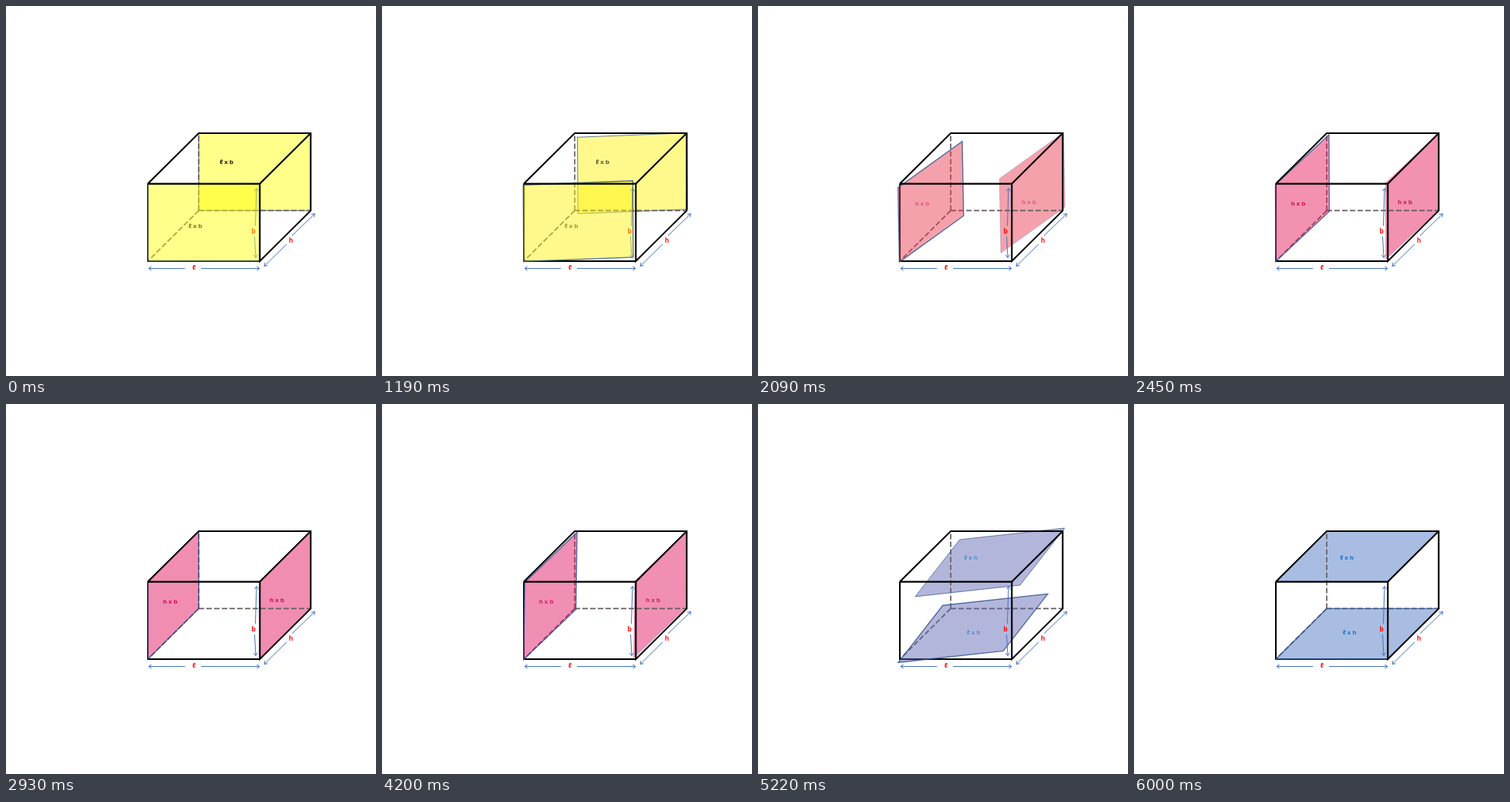
Recreate the animation shown at these times as an HTML page with a canvas. Size 480 by 480 pixels, loop 7.2 s.

```html
<!DOCTYPE html>
<html lang="en">
<head>
<meta charset="utf-8">
<title>Faces of a cuboid</title>
<style>
html, body { margin: 0; width: 100%; height: 100%; overflow: hidden; background: #fff; }
canvas { display: block; width: 480px; height: 480px; }
</style>
</head>
<body>
<canvas id="stage" width="480" height="480"></canvas>
<script>
const ctx = document.getElementById('stage').getContext('2d');
const LOOP = 7200, STEP = 60, STEPS = 31;
const MORPH_STARTS = [1130, 4200];
const BLUE = '#4472c4', RED = '#ff0000', BLACK = '#000';

const add = (...vs) => vs.reduce((a, b) => [a[0] + b[0], a[1] + b[1]]);
const scale = (v, k) => [v[0] * k, v[1] * k];
const mix = (a, b, p) => a.map((v, i) => v + (b[i] - v) * p);
const clamp = v => Math.max(0, Math.min(1, v));
const ease = u => 1 - Math.pow(1 - Math.pow(u, 1.5), 3.28);

// The box: near bottom-left corner and its three edges.
const BASE = [184, 331], WIDE = [145.3, 0], TALL = [0, -100.4], DEEP = [66, -65.6];
const corner = (w, t, d) => add(BASE, scale(WIDE, w), scale(TALL, t), scale(DEEP, d));

// A pair of faces is spanned by two edges and set apart by the third.
const PAIRS = [
  { across: WIDE, up: TALL, apart: DEEP, fill: [255, 255, 0],
    text: 'ℓ x b', spots: [[245.5, 285.5], [286, 202]], inks: ['#706c08', BLACK] },
  { across: DEEP, up: TALL, apart: WIDE, fill: [227, 7, 88],
    text: 'h x b', spots: [[213, 256.5], [351.5, 254.5]], inks: ['#d0004c', '#d0004c'] },
  { across: WIDE, up: DEEP, apart: TALL, fill: [68, 112, 192],
    text: 'ℓ x h', spots: [[279.5, 296], [276, 199]], inks: ['#0070c0', '#0070c0'] }
];

// Halfway through a turn one diagonal swings out and the other slips a little.
const SWING = [4, -8.5], SLIP = [1, -2], BACK_SHIFT = [1, 0.5];

function line(points, color, width, dash = []) {
  ctx.beginPath();
  points.forEach(([x, y]) => ctx.lineTo(x, y));
  ctx.strokeStyle = color;
  ctx.lineWidth = width;
  ctx.setLineDash(dash);
  ctx.stroke();
}

function arrow(from, to) {
  const a = Math.atan2(to[1] - from[1], to[0] - from[0]);
  const barb = s => add(to, [-4.5 * Math.cos(a + s), -4.5 * Math.sin(a + s)]);
  line([from, to], BLUE, 1);
  line([barb(0.6), to, barb(-0.6)], BLUE, 1);
}

function label(text, [x, y], color, size = 8, alpha = 1) {
  ctx.globalAlpha = alpha;
  ctx.fillStyle = color;
  ctx.font = `bold ${size}px "Liberation Sans", "DejaVu Sans", sans-serif`;
  ctx.textAlign = 'center';
  ctx.fillText(text, x, y + size * 0.36);
  ctx.globalAlpha = 1;
}

function pairLabels({ text, spots, inks }, alpha) {
  spots.forEach((spot, i) => label(text, spot, inks[i], 8, alpha));
}

function face(origin, across, up, main, side, fill, lineAlpha, lineWidth) {
  ctx.beginPath();
  [
    add(origin, up, scale(main, -1)),
    add(origin, up, across, side),
    add(origin, across, main),
    add(origin, scale(side, -1))
  ].forEach(([x, y]) => ctx.lineTo(x, y));
  ctx.closePath();
  ctx.fillStyle = `rgba(${fill.map(Math.round).join()},0.46)`;
  ctx.fill();
  ctx.strokeStyle = `rgba(47,82,143,${lineAlpha})`;
  ctx.lineWidth = lineWidth;
  ctx.setLineDash([]);
  ctx.stroke();
}

function heightMark() {
  arrow([323.5, 285], [325, 236.5]);
  arrow([322.5, 299], [324, 326.5]);
  label('b', [321, 291.5], RED, 8.5);
}

function draw(t) {
  const m = t < MORPH_STARTS[1] ? 0 : 1;
  const u = clamp((Math.floor((t - MORPH_STARTS[m]) / STEP) + 1) / STEPS);
  const p = ease(u), bulge = 4 * p * (1 - p);
  const a = PAIRS[m], b = PAIRS[m + 1];
  const [across, up, apart, fill] = ['across', 'up', 'apart', 'fill'].map(k => mix(a[k], b[k], p));
  const [main, side] = (m ? [SLIP, SWING] : [SWING, SLIP]).map(v => scale(v, bulge));
  const backLine = 0.8 - 0.7 * (m ? 1 - p : p);

  ctx.fillStyle = '#fff';
  ctx.fillRect(0, 0, 480, 480);

  face(add(BASE, apart, scale(BACK_SHIFT, bulge)), across, up, main, side, fill, backLine, 1);

  const hidden = corner(0, 0, 1);
  [corner(0, 1, 1), corner(1, 0, 1), BASE].forEach(end =>
    line([hidden, end], '#665e5e', 1.7, [7, 3]));
  line([corner(0, 1, 0), BASE, corner(1, 0, 0)], BLACK, 2);

  // The height mark lies under the upright faces but over the floor.
  const layers = [heightMark, () => face(BASE, across, up, main, side, fill, 0.8, 1.4)];
  if (m) layers.reverse();
  layers.forEach(paint => paint());

  line([corner(0, 1, 0), corner(1, 1, 0), corner(1, 0, 0), corner(1, 0, 1),
    corner(1, 1, 1), corner(0, 1, 1), corner(0, 1, 0)], BLACK, 2.1);
  line([corner(1, 1, 0), corner(1, 1, 1)], BLACK, 2.1);

  arrow([232, 340.5], [185, 340.5]);
  arrow([253, 340.5], [329, 340.5]);
  arrow([371, 298], [400.5, 269.5]);
  arrow([364, 309], [335, 337.5]);
  label('ℓ', [244, 339], RED, 9);
  label('h', [369.5, 304], RED, 8.5);

  pairLabels(a, clamp(1 - u * 4));
  pairLabels(b, clamp((u - 0.4) / 0.3));
}

const start = performance.now();
function tick() {
  draw((performance.now() - start) % LOOP);
  requestAnimationFrame(tick);
}
tick();
</script>
</body>
</html>
```
